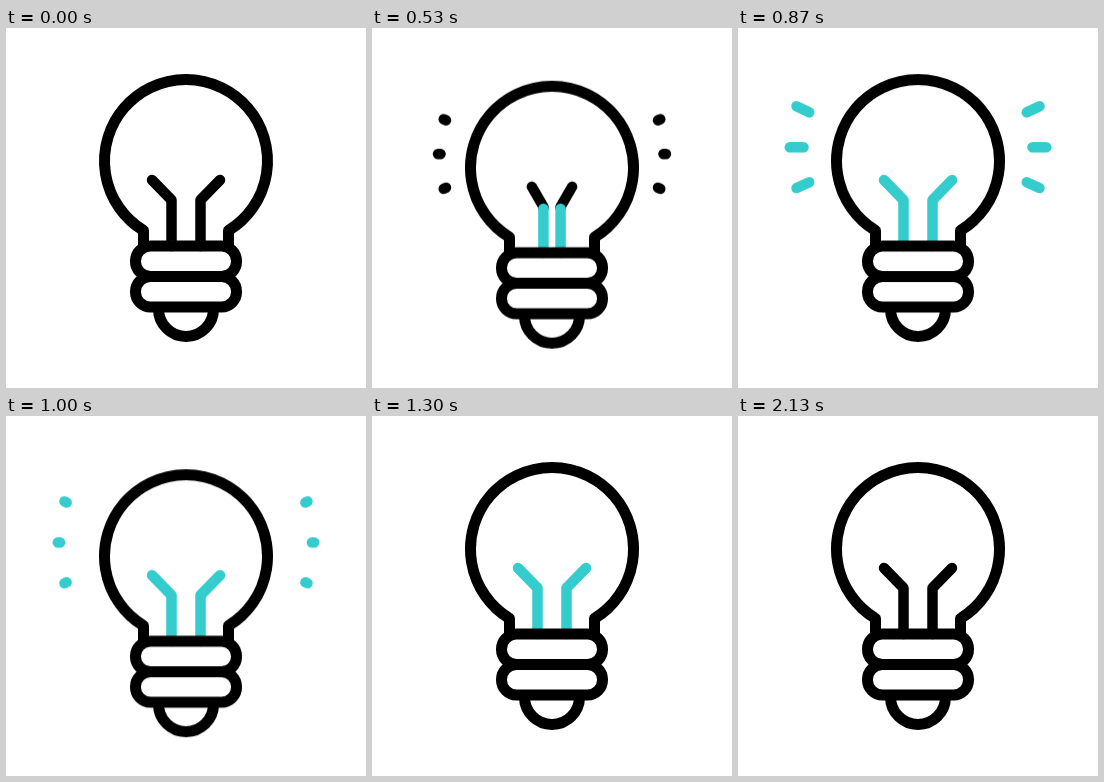
Write an HTML page that moves like this. It is 360 px wide and 360 px high and loops after 2500 ms.

```html
<!DOCTYPE html>
<html lang="en">
<head>
<meta charset="utf-8">
<title>Light bulb</title>
<style>
  html, body { margin: 0; width: 100%; height: 100%; overflow: hidden; background: #fff; }
  svg { display: block; width: 100%; height: 100%; }

  path, rect { fill: none; stroke: #000; stroke-width: 11; stroke-linejoin: round; }
  .wire, .ray { stroke-width: 10.5; stroke-linecap: round; stroke-dasharray: 1 2; }
  .lit { stroke: #34cccc; }

  .bulb, .wire, .ray {
    animation-duration: 2.5s;
    animation-iteration-count: infinite;
    animation-timing-function: cubic-bezier(.33, 0, .67, 1);
  }
  .bulb { animation-name: bob; }
  .wire { d: path("M165.5 218L165.5 172L146 152"); animation-name: squeeze, wire-off; }
  .wire.lit { animation-name: squeeze, wire-on; }
  .ray { animation-name: ray-grow, ray-fade; }
  .ray.lit { animation-name: lit-grow, lit-fade; }

  @keyframes bob {
    0%, 16%, 34.667%, 52%, 100% { transform: translateY(0); }
    26.267%, 44.667% { transform: translateY(13px); }
  }

  /* The two wires pinch together, keeping their line weight. */
  @keyframes squeeze {
    0%, 13.333%, 34.667%, 100% { d: path("M165.5 218L165.5 172L146 152"); }
    26.667% { d: path("M174.8 218L174.8 172L167.8 152"); }
  }

  /* Colour climbs the wire from its base, then drains back. */
  @keyframes wire-on {
    0%, 13.333%, 85.333%, 100% { stroke-dasharray: 0 2; }
    26.667%, 69.333% { stroke-dasharray: 1 2; }
  }
  @keyframes wire-off {
    0%, 13.333%, 85.333%, 100% { stroke-dashoffset: 0; }
    26.667%, 69.333% { stroke-dashoffset: -1.02; }
  }

  /* A positive offset keeps the empty dash and its round cap off the path. */
  @keyframes ray-grow {
    0%, 18.667% { stroke-dasharray: 0 2; }
    29.333%, 100% { stroke-dasharray: 1 2; }
  }
  @keyframes ray-fade {
    0% { stroke-dashoffset: .02; animation-timing-function: step-end; }
    18.667%, 26.667% { stroke-dashoffset: 0; }
    34.667%, 100% { stroke-dashoffset: -1.02; }
  }
  @keyframes lit-grow {
    0%, 26.667% { stroke-dasharray: 0 2; }
    34.667%, 100% { stroke-dasharray: 1 2; }
  }
  @keyframes lit-fade {
    0% { stroke-dashoffset: .02; animation-timing-function: step-end; }
    26.667%, 32% { stroke-dashoffset: 0; }
    42.667%, 100% { stroke-dashoffset: -1.02; }
  }
</style>
</head>
<body>
<svg viewBox="0 0 360 360">
  <g class="bulb">
    <g id="half">
      <path class="wire" pathLength="1"/>
      <path class="wire lit" pathLength="1"/>
      <path class="ray" pathLength="1" d="M74 85.5L58.5 78.2"/>
      <path class="ray" pathLength="1" d="M68.5 119.3H51.8"/>
      <path class="ray" pathLength="1" d="M74 153L58.5 160"/>
      <path class="ray lit" pathLength="1" d="M74 85.5L58.5 78.2"/>
      <path class="ray lit" pathLength="1" d="M68.5 119.3H51.8"/>
      <path class="ray lit" pathLength="1" d="M74 153L58.5 160"/>
    </g>
    <path id="glass" d="M137.5 218V202.5A81.5 81.5 0 1 1 222.5 202.5V218"/>
    <rect x="129.5" y="218" width="101" height="30.5" rx="15"/>
    <rect x="129.5" y="248.5" width="101" height="30.5" rx="15"/>
    <path d="M152.5 279V281A27.5 27.5 0 0 0 207.5 281V279"/>
  </g>
</svg>
<script>
  const half = document.getElementById('half');
  const mirror = half.cloneNode(true);
  mirror.removeAttribute('id');
  mirror.setAttribute('transform', 'translate(360) scale(-1 1)');
  half.after(mirror);
</script>
</body>
</html>
```
